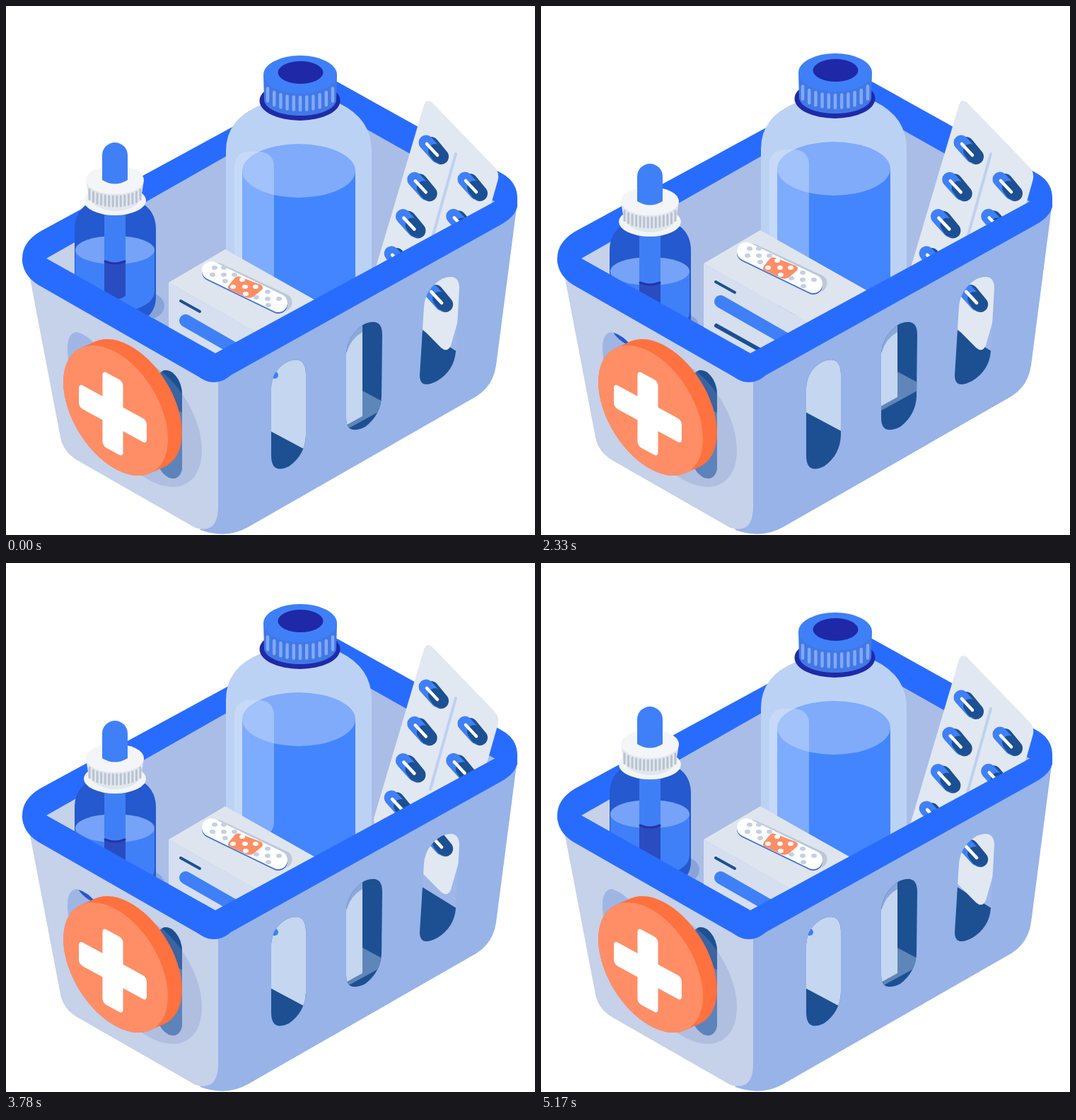
An HTML page that plays this animation: 748x748 px, repeating every 5200 ms.

```html
<!DOCTYPE html>
<html lang="en">
<head>
<meta charset="utf-8">
<title>Pharmacy basket</title>
<style>
html, body { margin: 0; width: 100%; height: 100%; overflow: hidden; background: #fff; }
svg { display: block; width: 100%; height: 100%; }
.line { fill: none; stroke-linecap: round; }
.rim { fill: #286cff; }
.navy { fill: #1c5092; }

.dropper, .box, .bottle, .pack { animation: 5200ms linear infinite; }
.dropper { animation-name: dropper; }
.box { animation-name: box; }
.bottle { animation-name: bottle; }
.pack { animation-name: pack; }

@keyframes dropper {
  0% { transform: translateY(0); }
  19.8077% { transform: translateY(0); animation-timing-function: steps(10, start); }
  25.5769% { transform: translateY(30px); }
  94.8077% { transform: translateY(30px); animation-timing-function: steps(9, start); }
  100% { transform: translateY(10px); }
}
@keyframes box {
  0% { transform: translateY(0); }
  19.8077% { transform: translateY(0); animation-timing-function: steps(10, start); }
  25.5769% { transform: translateY(-30px); }
  44.8077% { transform: translateY(-30px); animation-timing-function: steps(10, start); }
  50.5769%, 100% { transform: translateY(0); }
}
@keyframes bottle {
  0% { transform: translateY(0); }
  44.8077% { transform: translateY(0); animation-timing-function: steps(10, start); }
  50.5769% { transform: translateY(-30px); }
  69.8077% { transform: translateY(-30px); animation-timing-function: steps(10, start); }
  75.5769%, 100% { transform: translateY(0); }
}
@keyframes pack {
  0% { transform: translateY(0); }
  69.8077% { transform: translateY(0); animation-timing-function: steps(10, start); }
  75.5769% { transform: translateY(-30px); }
  94.8077% { transform: translateY(-30px); animation-timing-function: steps(9, start); }
  100% { transform: translateY(-3px); }
}
</style>
</head>
<body>
<svg viewBox="0 0 748 748">
  <defs>
    <linearGradient id="wall" x1="0" x2="1">
      <stop offset=".1" stop-color="#c6d1ea"/>
      <stop offset=".1" stop-color="#a9bde6"/>
    </linearGradient>

    <clipPath id="slotA"><path d="M375 540Q376 515 398 503Q423 493 424 520V607Q423 635 400 651Q375 663 375 635Z"/></clipPath>
    <clipPath id="slotB"><path d="M481 490Q484 465 506 450Q532 439 532 465L531 552Q530 578 508 595Q481 608 481 582Z"/></clipPath>
    <clipPath id="slotC"><path d="M585 522L591 425Q593 400 616 386Q640 376 641 398L636 488Q634 515 610 530Q585 543 585 522Z"/></clipPath>
    <clipPath id="slotD"><path d="M87 488Q86 462 100 461Q118 466 128 482V560L92 540Z"/></clipPath>

    <g id="pill" class="line">
      <path d="M-3-8L11 9" stroke="#1c5092" stroke-width="22"/>
      <path d="M-10-11L7 8" stroke="#3f80f8" stroke-width="21"/>
      <path d="M3 1L8 8" stroke="#1c5092" stroke-width="20"/>
      <path d="M-9-9L6 7" stroke="#fff" stroke-width="4.5"/>
    </g>

    <g id="packArt">
      <path fill="#e1e8f2" d="M591 140Q595 130 603 137L690 227Q699 236 695 248L629 480Q624 491 615 483L524 391Q518 385 521 376Z"/>
      <path class="line" stroke="#bdd1f0" stroke-width="4" d="M636 209L600 338"/>
      <g id="pills"></g>
    </g>

    <g id="dropperArt">
      <ellipse cx="196" cy="424" rx="28" ry="20" fill="#88a4d6"/>
      <path fill="#2459cf" d="M112 282Q97 294 97 316V412C97 470 212 470 212 412V316Q212 294 197 282Z"/>
      <path fill="#3f80f8" d="M98 345V403C98 442 210 442 210 403V345Z"/>
      <ellipse cx="154" cy="345" rx="56" ry="20" fill="#76a2f7"/>
      <path fill="#3f7ff6" d="M139 285H169V362Q154 369 139 362Z"/>
      <path fill="#2a4cc0" d="M139 361Q154 367 169 361V410Q154 420 139 410Z"/>
      <path class="line" stroke="#2733a8" stroke-width="3" d="M140 361Q154 367 168 361"/>
      <ellipse cx="154" cy="275" rx="44" ry="21" fill="#f2f4f7"/>
      <path fill="#e2e7ee" d="M113 246L117 272Q128 289 155 290Q182 289 191 272L195 246Z"/>
      <g id="collarRibs" class="line" stroke="#b9c2d0" stroke-width="3"></g>
      <ellipse cx="154" cy="246" rx="41" ry="20" fill="#f3f5f8"/>
      <path fill="#3f80f8" d="M136 211A18 18 0 0 1 172 211V246Q154 257 136 246Z"/>
    </g>
  </defs>

  <!-- inside and back of the basket -->
  <path class="rim" d="M23 357Q23 334 48 319L425 114Q450 97 470 108L700 236Q723 248 723 272V285L296 526L46 394Q23 378 23 357Z"/>
  <path fill="url(#wall)" d="M57 357L430 145Q443 137 456 144L692 277L296 491Z"/>

  <g class="bottle">
    <path fill="#bcd2f5" d="M360 140Q311 160 311 205V470H517V205Q517 160 472 138Z"/>
    <path fill="#4285fe" d="M334 233H494V440H334Z"/>
    <ellipse cx="414" cy="233" rx="80" ry="38" fill="#7fabfa"/>
    <rect x="323" y="206" width="56" height="193" rx="20" fill="#d5e3fa" opacity=".4"/>
    <ellipse cx="415.5" cy="134" rx="57" ry="28" fill="#1f2aa8"/>
    <path fill="#4079e6" d="M364 97L365 134C372 162 460 162 467 134L468 97Z"/>
    <g id="capRibs" class="line" stroke="#82a8f5" stroke-width="4.5"></g>
    <ellipse cx="416" cy="97" rx="52" ry="27" fill="#3f80f8"/>
    <ellipse cx="416.5" cy="94" rx="32" ry="16" fill="#1f28a6"/>
  </g>

  <g class="box">
    <path fill="#d5dff0" d="M230 391L381 476V560L230 500Z"/>
    <path fill="#c5d5f0" d="M381 476L470 434V540H381Z"/>
    <path fill="#dfe5ee" d="M230 391L310 344L471 435L381 476Z"/>
    <g class="line">
      <path stroke="#1c5092" stroke-width="4" d="M247 417L274 432"/>
      <path stroke="#3f80f8" stroke-width="18" d="M254 445L350 500"/>
      <path stroke="#1c5092" stroke-width="6" d="M248 479L325 522"/>
      <path stroke="#bcc8da" stroke-width="25" d="M300 376L392 419"/>
      <path stroke="#3f74d8" stroke-width="26" d="M290 376L385 422"/>
      <path stroke="#fff" stroke-width="26" d="M290 374L385 420"/>
    </g>
    <path fill="#ff8e66" d="M315 395L323 385Q326 381 331 383L360 394Q365 397 362 401L350 411Q345 414 340 412L316 401Q312 399 315 395Z"/>
    <g id="dots"></g>
  </g>

  <g class="dropper"><use href="#dropperArt"/></g>
  <g class="pack"><use href="#packArt"/></g>

  <!-- front faces -->
  <path fill="#97b3e8" d="M296 500L722 285L693 508Q689 537 665 552L342 737Q312 754 275 741L260 700Z"/>
  <path fill="#c6d1ea" d="M33 380L296 520H300V710Q299 747 268 738L102 643Q81 631 77 610Z"/>

  <g clip-path="url(#slotA)">
    <path class="navy" d="M370 490H430V665H370Z"/>
    <g class="box">
      <path fill="#c5d6f1" d="M370 470H430V631L370 599Z"/>
      <circle cx="380" cy="522" r="5" fill="#3f80f8"/>
    </g>
  </g>

  <g clip-path="url(#slotB)">
    <path class="navy" d="M475 435H540V610H475Z"/>
    <g class="box">
      <path fill="#5f86b9" d="M504 544L532 559V571L481 599V590L504 578Z"/>
      <path fill="#c5d6f1" d="M475 430H504V580L475 596Z"/>
    </g>
    <path fill="#8aa8dc" d="M475 500L482 489Q488 470 504 461V445L475 460Z"/>
  </g>

  <g clip-path="url(#slotC)">
    <path fill="#9db7e8" d="M580 375H650V540H580Z"/>
    <path class="navy" d="M580 453L640 490V545H580Z"/>
    <g class="pack"><use href="#packArt"/></g>
  </g>

  <g clip-path="url(#slotD)">
    <path fill="#9fb6e5" d="M80 455H135V565H80Z"/>
    <g class="dropper"><use href="#dropperArt"/></g>
  </g>

  <path fill="#4f7cb6" d="M214 530Q218 508 235 518Q249 530 249 550V655Q245 672 230 667Q214 657 214 640Z"/>
  <path class="navy" d="M214 530Q218 508 235 518Q249 530 249 550V575L214 560Z"/>

  <!-- badge -->
  <circle r="84" transform="matrix(.88 .48 0 .985 203 588)" fill="#7f93c8" opacity=".3"/>
  <path class="line" d="M0 0L22.7-20.2" stroke="#ff713e" stroke-width="168" transform="matrix(.88 .48 0 .985 155 572)"/>
  <circle r="84" transform="matrix(.88 .48 0 .985 155 572)" fill="#ff8e66"/>
  <g transform="matrix(.88 .48 0 .985 151 576.5)" fill="#fff">
    <rect x="-16.5" y="-54" width="33" height="108" rx="6"/>
    <rect x="-54.5" y="-17" width="109" height="34" rx="6"/>
  </g>

  <!-- front rim -->
  <path class="rim" d="M23 357L57 357L296 491L690 277L723 270V280Q723 296 700 309L318 522Q296 541 272 524L45 394Q23 380 23 357Z"/>
</svg>
<script>
const el = id => document.getElementById(id);

// Vertical grooves around the front of a round cap.
function ribs(id, n, cx, half, rx, y, ry, len) {
  let d = "";
  for (let i = 0; i < n; i++) {
    const dx = half * (2 * i / (n - 1) - 1);
    const top = y + ry * Math.sqrt(1 - (dx / rx) ** 2);
    d += `M${cx + dx} ${top}v${len}`;
  }
  el(id).innerHTML = `<path d="${d}"/>`;
}
ribs("capRibs", 11, 416, 46, 53, 104, 25, 18);
ribs("collarRibs", 14, 154, 36, 41, 251, 18, 14);

let pills = "";
for (let i = 0; i < 4; i++) {
  for (const [x, y] of [[604, 204], [659, 256]])
    pills += `<use href="#pill" x="${x - 16.3 * i}" y="${y + 52.3 * i}"/>`;
}
el("pills").innerHTML = pills;

const dots = (list, fill) => list.map(([x, y]) =>
  `<ellipse cx="${x}" cy="${y}" rx="4" ry="2.9" fill="${fill}"/>`).join("");
el("dots").innerHTML =
  dots([[292, 380], [295, 370], [308, 370], [308, 380], [323, 380], [310, 389],
        [354, 412], [370, 404], [370, 414], [386, 414], [371, 423]], "#c3d0e4") +
  dots([[321, 397], [334, 387], [338, 397], [353, 397], [339, 407]], "#fff");
</script>
</body>
</html>
```
